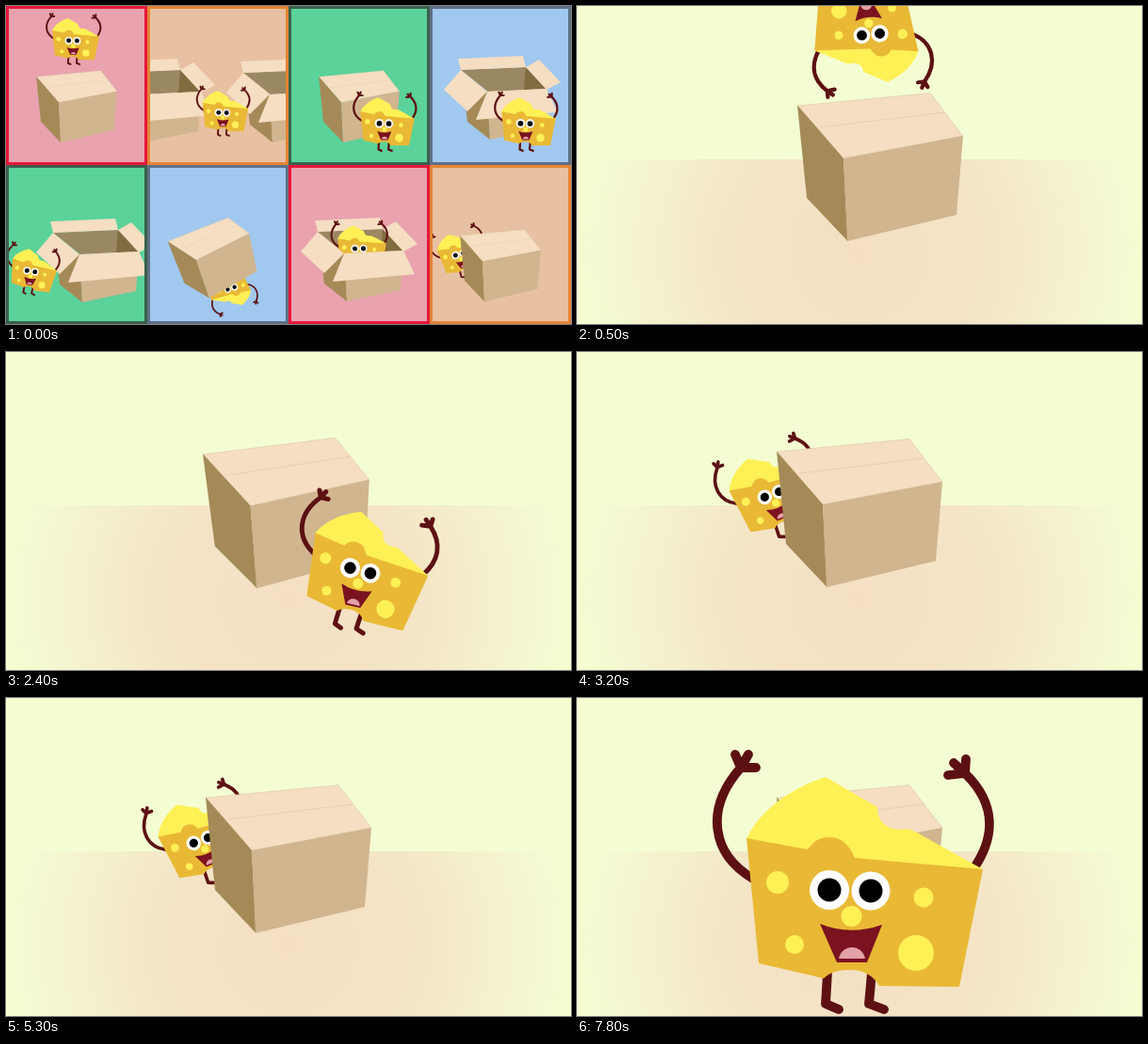
These frames come from a looping animation (600 px wide and 338 px high, 8 s). An HTML page:

```html
<!DOCTYPE html>
<html lang="en">
<head>
<meta charset="utf-8">
<title>Cheese and box</title>
<style>
html, body { margin: 0; width: 100%; height: 100%; overflow: hidden; background: #f4fdd2; }
svg { display: block; }
#stage { width: 100vw; height: 100vh; }
</style>
</head>
<body>
<svg id="stage" viewBox="0 0 600 338">
  <defs>
    <radialGradient id="glow" gradientUnits="userSpaceOnUse" cx="300" cy="262" r="305">
      <stop offset="0" stop-color="#f4dfc3"/>
      <stop offset=".45" stop-color="#f4e5c6"/>
      <stop offset="1" stop-color="#f4fdd2"/>
    </radialGradient>

    <!-- origin: midpoint between the eyes -->
    <g id="cheese"><g transform="translate(-290 -205)">
      <g fill="none" stroke="#5c1012" stroke-width="9.800" stroke-linecap="round" stroke-linejoin="round">
        <path d="M187 192C143 166 135 118 174 74M174 74L168 60M174 74L182 60M174 74L190 74"/>
        <path d="M420 183C445 148 445 112 412 80M412 80L394 82M412 80L400 69M412 80L413 65"/>
        <path d="M266 292L264 325L278 331M313 292L310 325L326 331"/>
      </g>
      <path fill="#fff056" d="M180 150C192 122 225 96 264 84L319 116C319 128 325 136 336 139C344 141 349 137 359 142L431 182L300 190Z"/>
      <path fill="#e9b935" d="M180 149L245 161C252 151 259 148 268 148C282 148 290 158 295 170L431 182L406 307L321 306C315 295 304 289 290 289C277 289 268 292 262 298L193 282Z"/>
      <g fill="#fff056">
        <circle cx="213" cy="196" r="12"/><circle cx="368" cy="212" r="10.5"/>
        <circle cx="231" cy="262" r="10"/><circle cx="360" cy="271" r="19"/>
      </g>
      <path fill="#7a1220" d="M258 240Q290 253 324 241L308 281H276Z"/>
      <path fill="#e3a0a8" d="M278 277C281 261 303 261 306 277Z"/>
      <circle cx="291.5" cy="232" r="11" fill="#fff056"/>
      <g fill="#fff"><circle cx="268" cy="204" r="21"/><circle cx="312" cy="205" r="20.5"/></g>
      <circle cx="268" cy="204" r="12.5"/><circle cx="312" cy="205" r="12.5"/>
    </g></g>

    <!-- origin: middle of the lid -->
    <g id="box"><g transform="translate(-300 -122)">
      <path fill="#f5dec2" stroke="#dcc6a6" stroke-width=".6" d="M212.500 106L353 92.500L388 138L261 162Z"/>
      <path fill="#a58a58" d="M212 105.500L261 162L265.500 250L222 204Z"/>
      <path fill="#d0b58f" d="M261 162L388 138L381 222L265 250Z"/>
      <path fill="none" stroke="#e2ccb0" stroke-width=".8" d="M236 129L368 113"/>
    </g></g>

    <g id="openBack">
      <path fill="#9a8862" d="M31 71L100 68L122 91L60 94Z"/>
      <path fill="#7f6c40" d="M100 68L122 91L98 92Z"/>
      <path fill="#f5dec2" d="M28 59L97 56L100 68L31 71Z"/>
      <path fill="#f5dec2" d="M100 68L114 60L137 84L122 92Z"/>
    </g>
    <g id="openFront">
      <path fill="#a58a58" d="M34 92L59 94L62 145L38 126Z"/>
      <path fill="#d0b58f" d="M59 94L122 91L119 133L62 145Z"/>
      <path fill="#f5dec2" d="M31 71L13 92L38 115L59 94Z"/>
      <path fill="#f5dec2" d="M59 94L122 91L134 116L47 124Z"/>
    </g>
  </defs>

  <rect width="600" height="338" fill="#f4fdd2"/>
  <rect y="163" width="600" height="175" fill="url(#glow)"/>
  <use id="behind" href="#cheese"/>
  <use id="mainBox" href="#box"/>
  <use id="ahead" href="#cheese"/>
  <g id="grid"></g>
</svg>
<script>
const LOOP = 8000;
const GRID_END = 100;
const el = id => document.getElementById(id);

// ---- opening grid ----
const themes = {
  pink: ["#e9a2ae", "#e5173a"],
  tan: ["#e8c1a2", "#e68434"],
  green: ["#5ad29a", "#3b604d"],
  blue: ["#a1c8ef", "#5f6f86"]
};
const place = (id, x, y, s = 1, r = 0) =>
  `<use href="#${id}" transform="translate(${x} ${y}) rotate(${r}) scale(${s})"/>`;
const cheese = (x, y, s, r) => place("cheese", x, y, s, r);
const closed = (x = 75, y = 83, r = 0) => place("box", x, y, .487, r);
const open = (x, y, inside = "") => place("openBack", x, y) + inside + place("openFront", x, y);

const cells = [
  ["pink", closed() + cheese(71, 37, .198, 0)],
  ["tan", open(-65, 0) + open(71, 0) + cheese(80, 113.5, .193, 0)],
  ["green", closed() + cheese(101.5, 125, .229, 0)],
  ["blue", open(2, -3) + cheese(101.5, 125, .229, 0)],
  ["green", open(19, 1) + cheese(26.5, 113, .193, 8)],
  ["blue", cheese(89, 131, .172, 159) + closed(65, 77, -16)],
  ["pink", open(0, 0, cheese(75, 89, .205, -2))],
  ["tan", cheese(31.5, 95, .195, -17) + closed()]
];
el("grid").innerHTML = cells.map(([theme, art], i) => {
  const [fill, edge] = themes[theme];
  return `<svg x="${i % 4 * 150}" y="${i < 4 ? 0 : 169}" width="150" height="169">
    <rect width="150" height="169" fill="${fill}"/>${art}
    <rect x="1.5" y="1.5" width="147" height="166" fill="none" stroke="${edge}" stroke-width="3"/></svg>`;
}).join("");

// ---- poses: cheese x, y, scale, angle; box x, y, angle ----
const above = [312, 30, .435, 0];
const flipped = [312, 30, .435, 173];
const under = [351.5, 237.5, .387, 128];
const beside = [207, 151.5, .37, -22];
const front = [379, 232, .52, 0];
const stepOut = [215, 170, .385, -12];
const close = [290, 205, 1, 0];
const bob = [290, 204.5, 1, 0];

const home = [300, 122, 0];
const right = [322, 122, 0];
const tilted = [275, 124.5, -16];

// two keys at the same time make a hard cut
const keys = [
  [100, above, right], [500, flipped, right], [950, flipped, right],
  [1400, under, tilted], [2000, under, tilted],
  [2500, front, home], [2700, front, home],
  [2700, beside, home], [3200, beside, home],
  [3700, above, home], [3800, above, home],
  [3900, flipped, right], [4000, under, tilted], [4300, under, tilted],
  [5000, front, home], [5300, front, home],
  [5300, beside, home], [5400, beside, home],
  [5800, stepOut, home], [6600, close, home], [7000, close, home],
  [7200, bob, home], [7400, close, home], [LOOP, close, home]
];
const frontSpans = [[2250, 2700], [4600, 5300], [5750, LOOP]];

const ease = p => p * p * (3 - 2 * p);
const mix = (a, b, p) => a.map((v, i) => v + (b[i] - v) * p);

function pose(t) {
  let i = 0;
  while (i < keys.length - 2 && t >= keys[i + 1][0]) i++;
  const [t0, c0, b0] = keys[i], [t1, c1, b1] = keys[i + 1];
  const p = ease(Math.min(1, Math.max(0, (t - t0) / (t1 - t0))));
  return [mix(c0, c1, p), mix(b0, b1, p)];
}

function draw(t) {
  const [[x, y, s, r], [bx, by, br]] = pose(t);
  const inFront = frontSpans.some(([a, b]) => t >= a && t < b);
  for (const id of ["behind", "ahead"]) {
    el(id).setAttribute("transform", `translate(${x} ${y}) rotate(${r}) scale(${s})`);
    el(id).setAttribute("display", (id === "ahead") === inFront ? "inline" : "none");
  }
  el("mainBox").setAttribute("transform", `translate(${bx} ${by}) rotate(${br})`);
  el("grid").setAttribute("display", t < GRID_END ? "inline" : "none");
}

let start;
function tick(now) {
  start ??= now;
  draw((now - start) % LOOP);
  requestAnimationFrame(tick);
}
draw(0);
requestAnimationFrame(tick);
</script>
</body>
</html>
```
